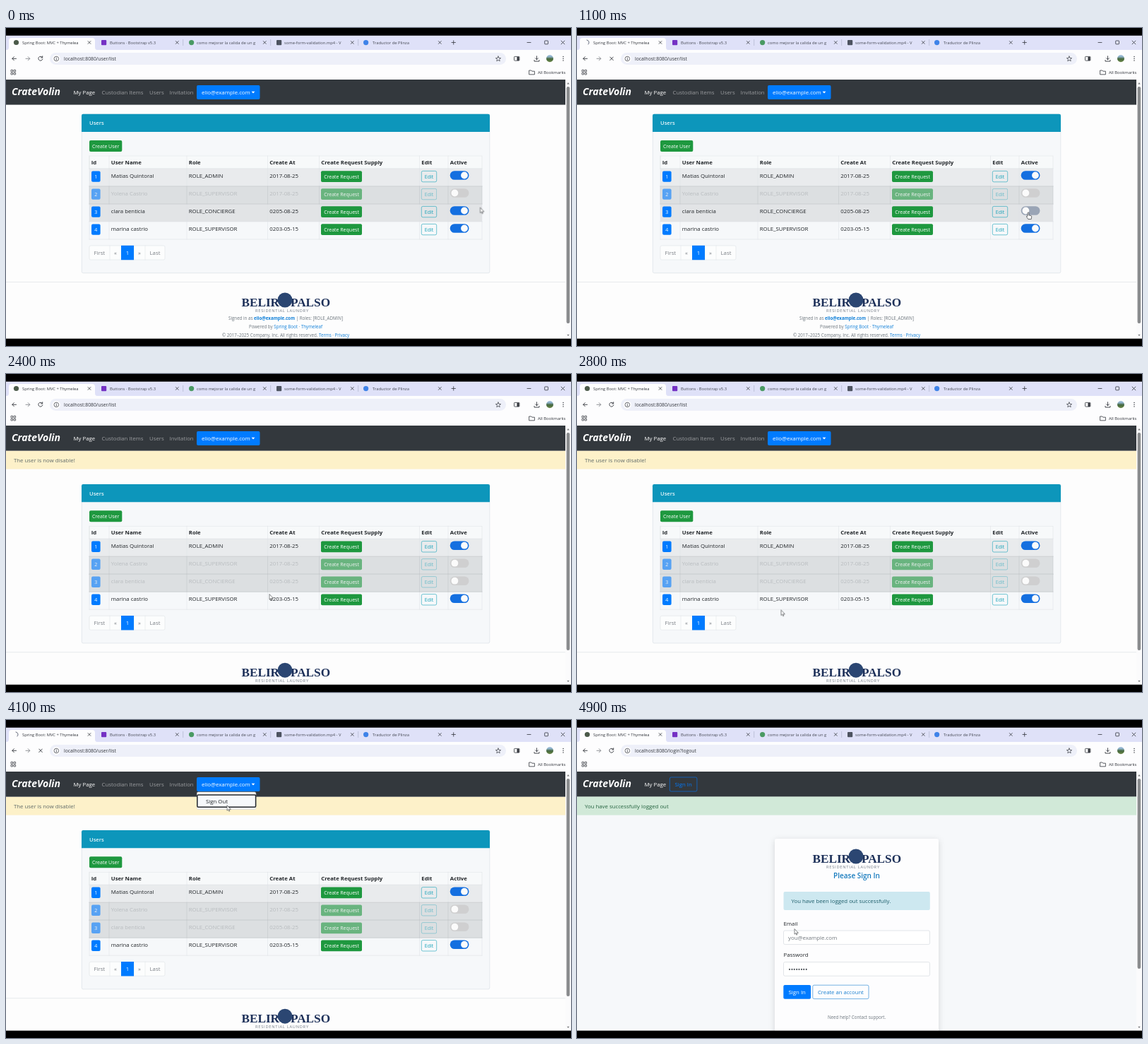
Write an HTML page that moves like this. It is 800 px wide and 450 px high and loops after 5000 ms.

```html
<!DOCTYPE html>
<html lang="en">
<head>
<meta charset="utf-8">
<title>User administration</title>
<style>
html, body { margin: 0; width: 100%; height: 100%; overflow: hidden; background: #000; }
svg { display: block; width: 100vw; height: 100vh; font-family: "Open Sans", "Noto Sans", sans-serif; }
text { white-space: pre; }
.mid { text-anchor: middle; }
.end { text-anchor: end; }
.bold { font-weight: 700; }
.semi { font-weight: 600; }
.brand { font-weight: 700; font-style: italic; }
.serif { font-family: "Liberation Serif", "Noto Serif", serif; font-weight: 700; }
.link { fill: #0f7fd8; }

.first, .second, .login, .session, .pending, .settled, .loading, .idle, .menu, .focus, .arrow, .hand {
  animation: 5s step-end infinite;
}
.first { animation-name: first; }
.second { animation-name: second; }
.login { animation-name: login; }
.session { animation-name: session; }
.pending { animation-name: pending; }
.settled { animation-name: settled; }
.loading { animation-name: loading; }
.idle { animation-name: idle; }
.menu { animation-name: menu; }
.focus { animation-name: focus; }
.arrow { animation-name: arrow; }
.hand { animation-name: hand; }
@keyframes first { 0% { opacity: 1 } 24%, 100% { opacity: 0 } }
@keyframes second { 0%, 84%, 100% { opacity: 0 } 24% { opacity: 1 } }
@keyframes login { 0% { opacity: 0 } 84%, 100% { opacity: 1 } }
@keyframes session { 0% { opacity: 1 } 84%, 100% { opacity: 0 } }
@keyframes pending { 0%, 24%, 100% { opacity: 0 } 20% { opacity: 1 } }
@keyframes settled { 0%, 24%, 100% { opacity: 1 } 20% { opacity: 0 } }
@keyframes loading { 0%, 24%, 84%, 100% { opacity: 0 } 22%, 82% { opacity: 1 } }
@keyframes idle { 0%, 24%, 84%, 100% { opacity: 1 } 22%, 82% { opacity: 0 } }
@keyframes menu { 0%, 84%, 100% { opacity: 0 } 72% { opacity: 1 } }
@keyframes focus { 0%, 84%, 100% { opacity: 0 } 80% { opacity: 1 } }
@keyframes arrow { 0%, 38%, 74%, 100% { opacity: 1 } 10%, 66% { opacity: 0 } }
@keyframes hand { 0%, 38%, 74%, 100% { opacity: 0 } 10%, 66% { opacity: 1 } }

.pointer { animation: move 5s infinite; }
@keyframes move {
  0% { transform: translate(671.5px, 254.5px); animation-timing-function: steps(6) }
  12% { transform: translate(639px, 261px); animation-timing-function: step-end }
  34% { transform: translate(639px, 261px); animation-timing-function: steps(6) }
  46% { transform: translate(540px, 290px); animation-timing-function: step-end }
  48% { transform: translate(373px, 312px); animation-timing-function: steps(5) }
  58% { transform: translate(268px, 340px); animation-timing-function: steps(5) }
  68% { transform: translate(326.5px, 95px); animation-timing-function: step-end }
  74% { transform: translate(313px, 121px); animation-timing-function: step-end }
  82% { transform: translate(313px, 121px); animation-timing-function: steps(4) }
  90% { transform: translate(282px, 240px); animation-timing-function: steps(4) }
  98%, 100% { transform: translate(308px, 296px) }
}
</style>
</head>
<body>
<svg id="stage" viewBox="0 0 800 450" xmlns="http://www.w3.org/2000/svg"></svg>
<script>
const BLUE = '#007bff', GREEN = '#1e983f', TEAL = '#17a2b8', INK = '#212529', GRAY = '#6c757d';
const EMAIL = 'elio@example.com';

const box = (x, y, w, h, fill, rx = 0, extra = '') =>
  `<rect x="${x}" y="${y}" width="${w}" height="${h}" fill="${fill}" rx="${rx}" ${extra}/>`;
const frame = (x, y, w, h, stroke, rx = 2, fill = 'none', width = .6) =>
  box(x, y, w, h, fill, rx, `stroke="${stroke}" stroke-width="${width}"`);
const text = (x, y, s, fill = INK, size = 7.8, cls = '') =>
  `<text x="${x}" y="${y}" fill="${fill}" font-size="${size}" class="${cls}">${s}</text>`;
const path = (d, stroke, width = .9, fill = 'none') =>
  `<path d="${d}" fill="${fill}" stroke="${stroke}" stroke-width="${width}" stroke-linecap="round" stroke-linejoin="round"/>`;
const dot = (x, y, r, fill) => `<circle cx="${x}" cy="${y}" r="${r}" fill="${fill}"/>`;
const group = (cls, body, attrs = '') => `<g class="${cls}" ${attrs}>${body}</g>`;
const shift = (dy, body) => `<g transform="translate(0 ${dy})">${body}</g>`;
const cross = (x, y, r, color, width = .8) =>
  path(`M${x - r} ${y - r}l${2 * r} ${2 * r}m0 ${-2 * r}l${-2 * r} ${2 * r}`, color, width);

function browser() {
  const dark = '#33363d';
  const tabs = [
    [135, 147, 'Buttons · Bootstrap v5.3', '#7431c4', 1],
    [259, 270, 'como mejorar la calida de un g', '#4a9a63', 3.6],
    [383, 394, 'some-form-validation.mp4 - V', '#4d5360', 1],
    [506, 519, 'Traductor de Plinza', '#3f83e8', 3.6],
  ];
  let s = box(0, 10.5, 800, 21, '#dfe1f8') + box(0, 31, 800, 42, '#fdfdfe') +
    path('M1 31Q4 31 4 27V18Q4 14 8 14H122Q126 14 126 18V27Q126 31 129 31Z', 'none', 0, '#fdfdfe');
  s += group('idle', dot(14.5, 20.5, 3.6, '#4b5a4a')) +
    group('loading', path('M14 17A3.6 3.6 0 0 1 16 23', '#4d5468', .9));
  s += text(23, 23, 'Spring Boot: MVC + Thymelea', dark, 5.8) + cross(118, 20.5, 1.9, dark);
  tabs.forEach(([ix, tx, label, color, r], i) => {
    s += box(ix, 17, 7.2, 7.2, color, r) + text(tx, 23, label, '#454853', 5.8) +
      cross(242.3 + i * 124, 20.5, 1.9, dark) +
      (i < 3 ? box(250.5 + i * 124, 16, .6, 9, '#a8abc4') : '');
  });
  s += path('M631 20.5h5.4M633.7 17.8v5.4M738 20.5h5', dark, .8) +
    frame(762.7, 18, 4.8, 4.8, dark, .6, 'none', .8) + cross(788.5, 20.5, 2.4, dark);

  s += path('M14.5 43.3H9m2.4-2.6L8.8 43.3l2.6 2.6', dark) +
    path('M28 43.3h5.6m-2.4-2.6 2.6 2.6-2.6 2.6', '#85888e') +
    group('idle', path('M51.3 41.4A3 3 0 1 0 51.8 44M51.7 39.8v2.2h-2.2', dark)) +
    group('loading', cross(49, 43.3, 2.3, dark, .9));
  s += box(62, 35, 646, 17, '#eef0f9', 8.5) + dot(71.3, 43.5, 5.6, '#fdfdfe') +
    `<circle cx="71.3" cy="43.5" r="3.3" fill="none" stroke="${dark}" stroke-width=".7"/>` +
    path('M71.3 43.2v2M71.3 41.7v.1', dark, .8);
  s += group('session', text(82, 45.9, 'localhost:8080/user/list', dark, 6.8)) +
    group('login', text(82, 45.9, 'localhost:8080/login?logout', dark, 6.8));
  s += path('M697 40l1 2.4 2.6.2-2 1.7.6 2.5-2.2-1.4-2.2 1.4.6-2.5-2-1.7 2.6-.2Z', dark, .7) +
    frame(719.5, 40.4, 7.4, 5.8, dark, .8, 'none', .8) + box(723.5, 41, 3, 5, dark) +
    path('M751.5 39.8v5m-2-2 2 2 2-2M748 45.5v1.6h7v-1.6', dark) +
    dot(770, 43.3, 5, 'url(#avatar)') +
    [40.5, 43.3, 46.1].map(y => dot(789, y, .75, dark)).join('');
  for (const x of [7, 11]) for (const y of [59.3, 63.3]) s += frame(x, y, 2.6, 2.6, dark, .3, 'none', .8);
  s += path('M741 60h2.8l1 1.2h3.6v4.6H741Z', dark, .8) + text(753, 64.9, 'All Bookmarks', dark, 5.9);
  return s;
}

const scrollbar = bottom => box(792, 73, 8, 367, '#fbfbfc') +
  box(793.6, 83, 4.6, bottom - 83, '#8a8c8e', 2.3) +
  path('M794.3 79.5l1.7-2.4 1.7 2.4Z', 'none', 0, '#77797b') +
  path('M794.3 433.7l1.7 2.4 1.7-2.4Z', 'none', 0, '#77797b');

const navbar = items => box(0, 73, 792, 35.6, '#33383d') +
  text(8, 95.2, 'CrateVolin', '#fff', 14, 'brand') + text(95.5, 94, 'My Page', '#fff') + items;

const accountMenu = text(135.5, 94, 'Custodian Items', '#9a9c9f') + text(203, 94, 'Users', '#9a9c9f') +
  text(231.5, 94, 'Invitation', '#9a9c9f') + box(270, 81, 89.5, 20, BLUE, 2) +
  text(277, 94, EMAIL, '#fff') + path('M347.6 89.8h4.8l-2.4 2.6Z', 'none', 0, '#fff');

const logo = text(333.5, 394, 'BELIR', '#1d3059', 17.2, 'serif') +
  text(459, 394, 'PALSO', '#1d3059', 17.2, 'serif end') + dot(395, 385, 10.5, '#2b4672') +
  `<text x="353" y="401.5" font-size="5.7" fill="#727a86" letter-spacing=".75">RESIDENTIAL LAUNDRY</text>`;

const toggle = (y, on, off = '#cfcfd0') => box(628.7, y - 6.3, 26.8, 12.6, on ? '#146fe0' : off, 6.3) +
  dot(on ? 649 : 635.4, y, 4.9, '#fbfbfb');

const solidButton = (x, y, w, h, label, fill, size = 7) =>
  box(x, y, w, h, fill, 2) + text(x + w / 2, y + h / 2 + size * .36, label, '#fff', size, 'mid');
const lineButton = (x, y, w, h, label, color, size = 7) =>
  frame(x, y, w, h, color) + text(x + w / 2, y + h / 2 + size * .36, label, color, size, 'mid');

const COLUMNS = [118, 146, 256, 370.5, 443.5, 585.5, 626, 674];
const USERS = [
  ['Matias Quintoral', 'ROLE_ADMIN', '2017-08-25'],
  ['Yolena Castrio', 'ROLE_SUPERVISOR', '2017-08-25'],
  ['clara benticia', 'ROLE_CONCIERGE', '0205-08-25'],
  ['marina castrio', 'ROLE_SUPERVISOR', '0203-05-15'],
];

function userRow(user, i, active, hovered) {
  const y = 199 + i * 25;
  const fill = !active ? '#dcdfe1' : hovered ? '#e2e4e6' : i % 2 ? '#f6f8fa' : '#e9ebed';
  const line = active ? '#dde1e4' : '#bfc3c6';
  let s = box(118, y, 556, 25, fill) + path(`M118 ${y}H674M118 ${y + 25}H674`, line, .6) +
    COLUMNS.map(x => path(`M${x} ${y}v25`, line, .5)).join('');
  user.forEach((v, k) => s += text(COLUMNS[k + 1] + 2.8, y + 12.6, v, active ? INK : '#b8bcbf'));
  s += group('', solidButton(121, y + 3.4, 12.6, 15.4, i + 1, BLUE) +
    solidButton(446, y + 3.2, 58, 15.8, 'Create Request', GREEN) +
    lineButton(588.3, y + 3.4, 21.4, 15.4, 'Edit', TEAL), active ? '' : 'opacity=".6"');
  const ty = y + 9.5;
  if (hovered) return s + group('settled', toggle(ty, true)) + group('pending', toggle(ty, false, '#9aa5b6'));
  return s + toggle(ty, active);
}

function userList(disabled, hoveredRow) {
  let s = frame(107.3, 122, 577.5, 224.7, '#d5dce2', 2, '#f6f8fa') +
    path('M107 147V124Q107 121.7 109.3 121.7H682.7Q685 121.7 685 124V147Z', 'none', 0, '#0d96bb') +
    text(118, 137.4, 'Users', '#e9f6fa', 7.6, 'semi') + solidButton(118, 159, 46.3, 16, 'Create User', GREEN);
  s += frame(118, 181, 556, 18, '#dde1e4', 0, '#f7f9fa', .5);
  ['Id', 'User Name', 'Role', 'Create At', 'Create Request Supply', 'Edit', 'Active'].forEach((h, i) =>
    s += text(COLUMNS[i] + 2.8, 193.2, h, INK, 7.75, 'bold') + path(`M${COLUMNS[i]} 181v18`, '#dde1e4', .5));
  // Disabled rows go last so their darker borders stay on top.
  const order = [0, 1, 2, 3].sort((a, b) => disabled.includes(a) - disabled.includes(b));
  for (const i of order) s += userRow(USERS[i], i, !disabled.includes(i), i === hoveredRow);
  s += frame(118, 308, 107, 20, '#dee2e6', 2, '#fcfdfd') +
    [147, 181, 197].map(x => path(`M${x} 308v20`, '#dee2e6', .5)).join('') + box(163, 307.8, 18, 20.4, BLUE);
  [[132.3, 'First'], [155, '«'], [172, '1'], [189, '»'], [211, 'Last']].forEach(([x, v]) =>
    s += text(x, 321, v, v === '1' ? '#fff' : '#7a7f85', 7.8, 'mid'));
  s += path('M0 359.5H792', '#dfe3e6', .7) + logo;
  const line = (y, v) => text(396, y, v, GRAY, 6.2, 'mid');
  const link = v => `<tspan class="link">${v}</tspan>`;
  return s + line(413, `Signed in as <tspan class="link bold">${EMAIL}</tspan> | Roles: [ROLE_ADMIN]`) +
    line(425, `Powered by ${link('Spring Boot')} · ${link('Thymeleaf')}`) +
    line(437, `© 2017–2025 Company, Inc. All rights reserved. ${link('Terms')} · ${link('Privacy')}`);
}

const page = (fill, body) => box(0, 73, 792, 367, fill) + body;
const notice = (fill, color, v) => box(0, 108.6, 792, 26, fill) + text(11, 124.8, v, color);

const firstPage = page('#fdfdfd', navbar(accountMenu) + userList([1], 2) + scrollbar(418));

const dropdown = frame(270.3, 102, 83.5, 24.5, '#d0d3d6', 2, '#fff') +
  text(283, 117.8, 'Sign Out') +
  group('focus', frame(270.8, 106, 82.8, 17.3, '#22262b', 1.5, '#f6f8fa', 1.5) + text(283, 117.8, 'Sign Out'));

const secondPage = page('#fdfdfd', shift(34.2, userList([1, 2], -1)) +
  notice('#fdf1c9', '#5f6a68', 'The user is now disable!') +
  navbar(accountMenu) + scrollbar(391) + group('menu', dropdown));

const loginPage = page('#f6f8fa',
  navbar(lineButton(131.3, 81, 38.6, 20, 'Sign In', BLUE, 7.8)) +
  notice('#d1e9d8', '#24633f', 'You have successfully logged out') +
  box(280, 168, 232, 290, '#fdfdfe', 3, 'filter="url(#shadow)"') + shift(-192, logo) +
  text(396, 224.2, 'Please Sign In', '#1479bd', 10, 'semi mid') +
  box(292.5, 243, 207.3, 26, '#cde8f0', 2) +
  text(303.5, 259, 'You have been logged out successfully.', '#1b5c69') +
  text(292.5, 290.6, 'Email') + frame(292.5, 298, 207, 19.6, '#ced4da', 2, '#fff') +
  text(299, 311.2, 'you@example.com', '#72787e') +
  text(292.5, 335.2, 'Password') + frame(292.5, 342.6, 207, 19.6, '#ced4da', 2, '#fff') +
  text(299.3, 355.8, '••••••••', '#3f454b', 9) +
  solidButton(292.3, 375, 38.8, 19.8, 'Sign In', BLUE, 7.8) +
  lineButton(333.8, 375.2, 79.2, 19.4, 'Create an account', '#187fd0', 7.7) +
  text(396, 423, 'Need help? Contact support.', GRAY, 6.2, 'mid') + scrollbar(352));

const pointer = group('arrow', path('M0 0V7.2L1.7 5.7 2.8 8.2 3.9 7.7 2.8 5.3H5Z', '#33363a', .6, '#fff')) +
  group('hand', path('M-.9 5V.8a.9.9 0 0 1 1.8 0V4l3 .7q1 .3.8 1.4L4.2 9.5H-.2L-2.6 6q-.2-1.2.9-.9Z', '#33363a', .7, '#fff'));

document.getElementById('stage').innerHTML = `<defs>
  <linearGradient id="avatar" x2="0" y2="1"><stop offset=".2" stop-color="#93b6d2"/>
    <stop offset=".55" stop-color="#43663c"/><stop offset="1" stop-color="#6f8a4b"/></linearGradient>
  <filter id="shadow" x="-10%" y="-10%" width="120%" height="120%">
    <feDropShadow dx="0" dy="2" stdDeviation="4" flood-opacity=".14"/></filter>
  </defs>` +
  group('first', firstPage) + group('second', secondPage) + group('login', loginPage) +
  browser() + group('pointer', pointer) +
  box(0, 0, 800, 10.5, '#000') + box(0, 439.6, 800, 10.4, '#000');
</script>
</body>
</html>
```
